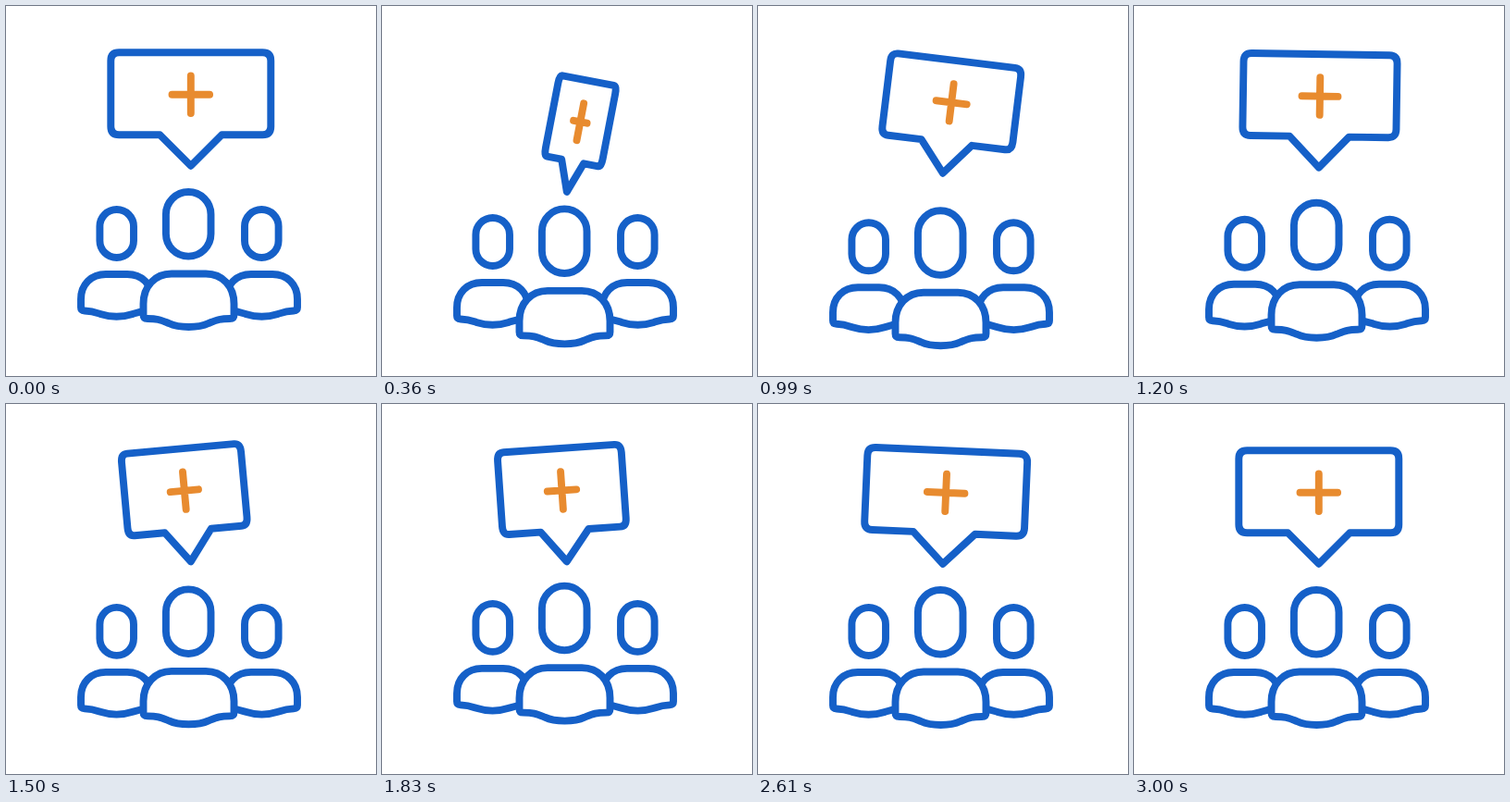
These frames come from a looping animation (400x400 px, 4090 ms). An HTML page with a canvas:

```html
<!DOCTYPE html>
<html lang="en">
<head>
<meta charset="utf-8">
<title>Group with speech bubble</title>
<style>
  html, body { margin: 0; width: 100%; height: 100%; overflow: hidden; background: #fff; }
  canvas { display: block; width: 400px; height: 400px; }
</style>
</head>
<body>
<canvas id="stage" width="400" height="400"></canvas>
<script>
const ctx = document.getElementById('stage').getContext('2d');
const LOOP = 4090, MOVE_END = 3000, STEP = 30;
const BLUE = '#1560c8', ORANGE = '#e88b2f', LINE = 7.9;
const MIRROR = 396;

const easeInOut = u => (1 - Math.cos(Math.PI * u)) / 2;

// Eases from pose to pose and rests on the last one
function pose(t, times, values) {
  const i = times.findIndex(time => time > t);
  if (i < 0) return values[values.length - 1];
  const u = (t - times[i - 1]) / (times[i] - times[i - 1]);
  return values[i - 1] + (values[i] - values[i - 1]) * easeInOut(u);
}

// Duck, hold, rebound, settle
const middleY = t => pose(t, [0, 540, 740, 1740, 2350], [0, 24.5, 24.5, -4.6, 0]);
const sideY = t => pose(t, [0, 620, 980, 1740, 2350], [0, 14.3, 14.3, -4.4, 0]);

const hops = [0, 430, 520, 1200, 1620, 2250];
const bubbleY = t => pose(t, hops, [0, 30, 30, 1.8, -3.4, 0]);
const bubbleWidth = t => pose(t, hops, [1, 0.32, 0.32, 0.96, 0.7, 1]);
const bubbleTilt = t => pose(t, [0, 540, 1620, 2350, 3000], [0, 14.5, -5.8, 3.8, 0]);

function outline(path, color = BLUE) {
  ctx.lineWidth = LINE;
  ctx.lineCap = ctx.lineJoin = 'round';
  ctx.strokeStyle = color;
  ctx.stroke(path);
}

function solid(path) {
  ctx.fillStyle = '#fff';
  ctx.fill(path);
  outline(path);
}

function capsule(x, y, w, h) {
  const path = new Path2D();
  path.roundRect(x, y, w, h, w / 2);
  return path;
}

const middleHead = capsule(172.9, 201, 48.6, 69.6);
const middleBody = new Path2D(
  'M148.5 334V322C148.5 303 161 289.5 179 289.5H216C234 289.5 246.5 303 246.5 322V334' +
  'Q246.5 338 242 338C231 338 228 339.5 219 343C208 348.3 187 348.3 176 343' +
  'C167 339.5 164 338 153 338Q148.5 338 148.5 334Z');
const sideHead = capsule(101.4, 220, 36.6, 52);
const sideBody = new Path2D(
  'M81 326V317C81 301 92 290 108 290H131C147 290 158 301 158 317V326' +
  'Q158 329.3 154 329.5C145 330 143 331 137 333C126 336.5 113 336.5 102 333' +
  'C96 331 94 330 85 329.5Q81 329.3 81 326Z');

function person(head, body) {
  outline(head);
  solid(body);
}

function drawPeople(t) {
  ctx.save();
  ctx.translate(0, sideY(t));
  person(sideHead, sideBody);
  ctx.translate(MIRROR, 0);
  ctx.scale(-1, 1);
  person(sideHead, sideBody);
  ctx.restore();

  ctx.save();
  ctx.translate(0, middleY(t));
  person(middleHead, middleBody);
  ctx.restore();
}

// Bubble coordinates start at the tip of its tail
const bubble = new Path2D(
  'M0 0L-33.5 -33.5H-77.5Q-86.5 -33.5 -86.5 -42.5V-113.5Q-86.5 -122.5 -77.5 -122.5' +
  'H77.5Q86.5 -122.5 86.5 -113.5V-42.5Q86.5 -33.5 77.5 -33.5H33.5Z');
const plus = new Path2D('M-20.3 -77H20.3M0 -97.3V-56.7');

function drawBubble(t) {
  const matrix = new DOMMatrix()
    .translate(199.8, 172.8 + bubbleY(t))
    .rotate(bubbleTilt(t))
    .scale(bubbleWidth(t), 1);
  // Only the points are squeezed; the line keeps its weight
  for (const [shape, color] of [[bubble, BLUE], [plus, ORANGE]]) {
    const path = new Path2D();
    path.addPath(shape, matrix);
    outline(path, color);
  }
}

function draw() {
  const now = performance.now() % LOOP;
  const t = Math.min(MOVE_END, Math.floor(now / STEP) * STEP);
  ctx.fillStyle = '#fff';
  ctx.fillRect(0, 0, 400, 400);
  drawPeople(t);
  drawBubble(t);
  requestAnimationFrame(draw);
}

draw();
</script>
</body>
</html>
```
